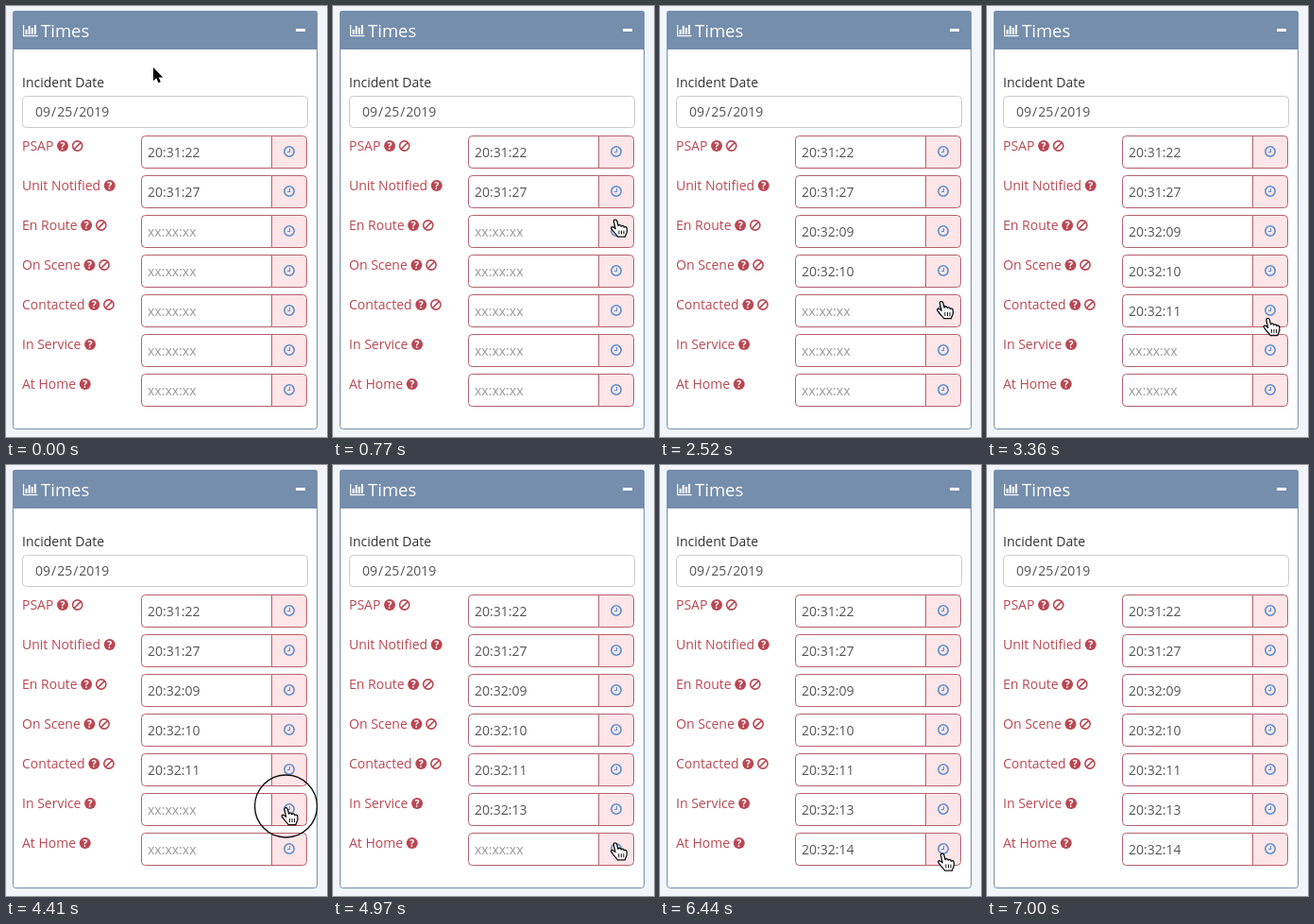
Animation of 340x456 px, one loop 7700 ms. Source, as an HTML page with a canvas:

```html
<!DOCTYPE html>
<html lang="en">
<head>
<meta charset="utf-8">
<title>Times</title>
<style>
  html, body { margin: 0; width: 100%; height: 100%; overflow: hidden; background: #f1f5fb; }
  canvas { display: block; width: 340px; height: 456px; }
</style>
</head>
<body>
<canvas id="stage"></canvas>
<script>
const W = 340, H = 456, LOOP = 7700, STEP = 70;
const canvas = document.getElementById('stage');
const ratio = window.devicePixelRatio || 1;
canvas.width = W * ratio;
canvas.height = H * ratio;
const ctx = canvas.getContext('2d');
ctx.scale(ratio, ratio);

const RED = '#b94853', BORDER = '#b5606e', PINK = '#fee5e7', BLUE = '#5b8fce', HEADER = '#758eac';
const FONT = '"Open Sans", "Noto Sans", sans-serif';
const ROW_TOP = 137.5, ROW_GAP = 42, ROW_H = 34;
const LEFT = 143.5, SPLIT = 281.5, RIGHT = 318.5;

const rows = [
  { label: 'PSAP', value: '20:31:22', at: 0, ban: true },
  { label: 'Unit Notified', value: '20:31:27', at: 0 },
  { label: 'En Route', value: '20:32:09', at: 1190, ban: true },
  { label: 'On Scene', value: '20:32:10', at: 2170, ban: true },
  { label: 'Contacted', value: '20:32:11', at: 3150, ban: true },
  { label: 'In Service', value: '20:32:13', at: 4550 },
  { label: 'At Home', value: '20:32:14', at: 6020 }
];
const PRESS = 140;

// Pointer hotspot: [time, x, y]
const track = [
  [0, 156, 65], [770, 299, 224.5], [910, 305, 229],
  [1120, 305, 229], [1680, 296, 283.5],
  [2100, 296, 283.5], [2520, 298, 311], [2730, 298, 311.5],
  [3080, 298, 311.5], [3780, 296.5, 361],
  [4480, 296.5, 361], [5180, 299.5, 408.5],
  [6230, 299.5, 408.5], [6440, 299, 409.5],
  [6510, 299, 409.5], [7000, 255, 464], [LOOP, 255, 464]
];

const handPath = new Path2D(
  'M-1.6 3.6C-2 1.2 1.2.8 1.8 3L3.1 8C3.4 6.6 6 6.6 6.3 8.6C6.9 7.4 9.1 7.7 9.4 9.6' +
  'C10 8.7 12.2 9 12.3 11L12.4 14C12.2 16.5 10.6 17.4 10.5 19.6L2.5 19.6' +
  'C2 18 -1 15.5 -2.3 13.6C-3.5 12 -5 10.6 -4.2 9.6C-3.2 8.6 -1.3 9.8 .2 11.4Z');
const handLines = new Path2D('M3.9 13V17M6.5 13V17M9 13V17');
const arrowPath = new Path2D('M0 0V14.2L3.3 11.2L5.5 16.3L7.8 15.3L5.7 10.4H10.2Z');
const beamPath = new Path2D('M-3 -8Q0 -8 0 -6Q0 -8 3 -8M0 -6V6M-3 8Q0 8 0 6Q0 8 3 8');

function text(str, x, y, color, size = 14) {
  ctx.font = `${size}px ${FONT}`;
  ctx.fillStyle = color;
  ctx.fillText(str, x, y);
  return ctx.measureText(str).width;
}

function stroke(color, width, path) {
  ctx.strokeStyle = color;
  ctx.lineWidth = width;
  path ? ctx.stroke(path) : ctx.stroke();
}

function box(x, y, w, h, radius, fill, line) {
  ctx.beginPath();
  ctx.roundRect(x, y, w, h, radius);
  ctx.fillStyle = fill;
  ctx.fill();
  if (line) stroke(line, 1);
}

function ring(x, y, r, color, width) {
  ctx.beginPath();
  ctx.arc(x, y, r, 0, Math.PI * 2);
  stroke(color, width);
}

function helpIcon(x, y) {
  ctx.beginPath();
  ctx.arc(x, y, 6, 0, Math.PI * 2);
  ctx.fillStyle = RED;
  ctx.fill();
  ctx.textAlign = 'center';
  text('?', x, y + 3.9, '#fff', `bold 10.5`);
  ctx.textAlign = 'left';
}

function banIcon(x, y) {
  ring(x, y, 5.1, RED, 1.6);
  ctx.beginPath();
  ctx.moveTo(x - 3.6, y + 3.6);
  ctx.lineTo(x + 3.6, y - 3.6);
  stroke(RED, 1.6);
}

function clockIcon(x, y) {
  ring(x, y, 5.2, BLUE, 1.6);
  ctx.beginPath();
  ctx.moveTo(x + .5, y - 3);
  ctx.lineTo(x + .5, y + .5);
  ctx.lineTo(x - 2, y + .5);
  stroke(BLUE, 1.1);
}

function drawPanel() {
  ctx.fillStyle = '#f1f5fb';
  ctx.fillRect(0, 0, W, H);
  box(7.5, 5.5, 322, 442, 3, '#fff', HEADER);
  box(7, 5, 323, 41, [3, 3, 0, 0], HEADER);

  ctx.fillStyle = '#fff';
  ctx.fillRect(18, 20, 1.2, 12);
  ctx.fillRect(18, 31, 15.5, 1.2);
  [5, 9, 7, 10].forEach((h, i) => ctx.fillRect(20.6 + i * 3.1, 30 - h, 2, h));
  ctx.fillRect(307, 24, 10, 3);
  text('Times', 37, 33, '#fff', 18.5);

  text('Incident Date', 17, 86, '#333');
  box(17.5, 95.5, 302, 33, 4, '#fff', '#ccc');
  let x = 31;
  for (const part of ['09', '/', '25', '/', '2019']) x += text(part, x, 117, '#555') + 1;
}

function drawRow(row, i, t) {
  const top = ROW_TOP + i * ROW_GAP, mid = top + 10.5;
  let x = 17 + text(row.label, 17, top + 15.5, RED) + 9.64;
  helpIcon(x, mid);
  if (row.ban) banIcon(x + 15.64, mid);

  box(LEFT, top, SPLIT - LEFT, ROW_H, [4, 0, 0, 4], '#fff', BORDER);
  box(SPLIT, top, RIGHT - SPLIT, ROW_H, [0, 4, 4, 0], PINK, BORDER);
  const filled = t >= row.at;
  text(filled ? row.value : 'xx:xx:xx', 150, top + 22.5, filled ? '#555' : '#999');
  clockIcon(300, top + 16.5);
}

function pointerAt(t) {
  const i = track.findIndex(key => key[0] > t);
  const [t0, x0, y0] = track[i - 1], [t1, x1, y1] = track[i];
  const u = (t - t0) / (t1 - t0), e = u * u * (3 - 2 * u);
  return [x0 + (x1 - x0) * e, y0 + (y1 - y0) * e];
}

function pointerKind(x, y) {
  const inDate = x > 17 && x < 320 && y > 95 && y < 129;
  const offset = y - ROW_TOP;
  const inRow = offset >= 0 && offset < ROW_GAP * rows.length && offset % ROW_GAP <= ROW_H;
  if (inRow && x >= SPLIT && x <= RIGHT) return 'hand';
  return inDate || (inRow && x >= LEFT && x < SPLIT) ? 'beam' : 'arrow';
}

function drawPointer(t) {
  const [x, y] = pointerAt(t);
  if (rows.some(row => row.at && t >= row.at - PRESS && t < row.at)) ring(x, y, 33, '#111', 1.4);
  ctx.save();
  ctx.translate(x, y);
  ctx.lineJoin = 'round';
  const kind = pointerKind(x, y);
  if (kind === 'hand') {
    ctx.fillStyle = '#fff';
    ctx.fill(handPath);
    stroke('#111', 1.3, handPath);
    stroke('#111', 1, handLines);
  } else if (kind === 'beam') {
    stroke('#333', 1, beamPath);
  } else {
    stroke('#fff', 2, arrowPath);
    ctx.fillStyle = '#000';
    ctx.fill(arrowPath);
  }
  ctx.restore();
}

function render(now) {
  const t = Math.floor((now % LOOP) / STEP) * STEP;
  drawPanel();
  rows.forEach((row, i) => drawRow(row, i, t));
  drawPointer(t);
}

const start = performance.now();
function tick() {
  render(performance.now() - start);
  requestAnimationFrame(tick);
}
tick();
</script>
</body>
</html>
```
